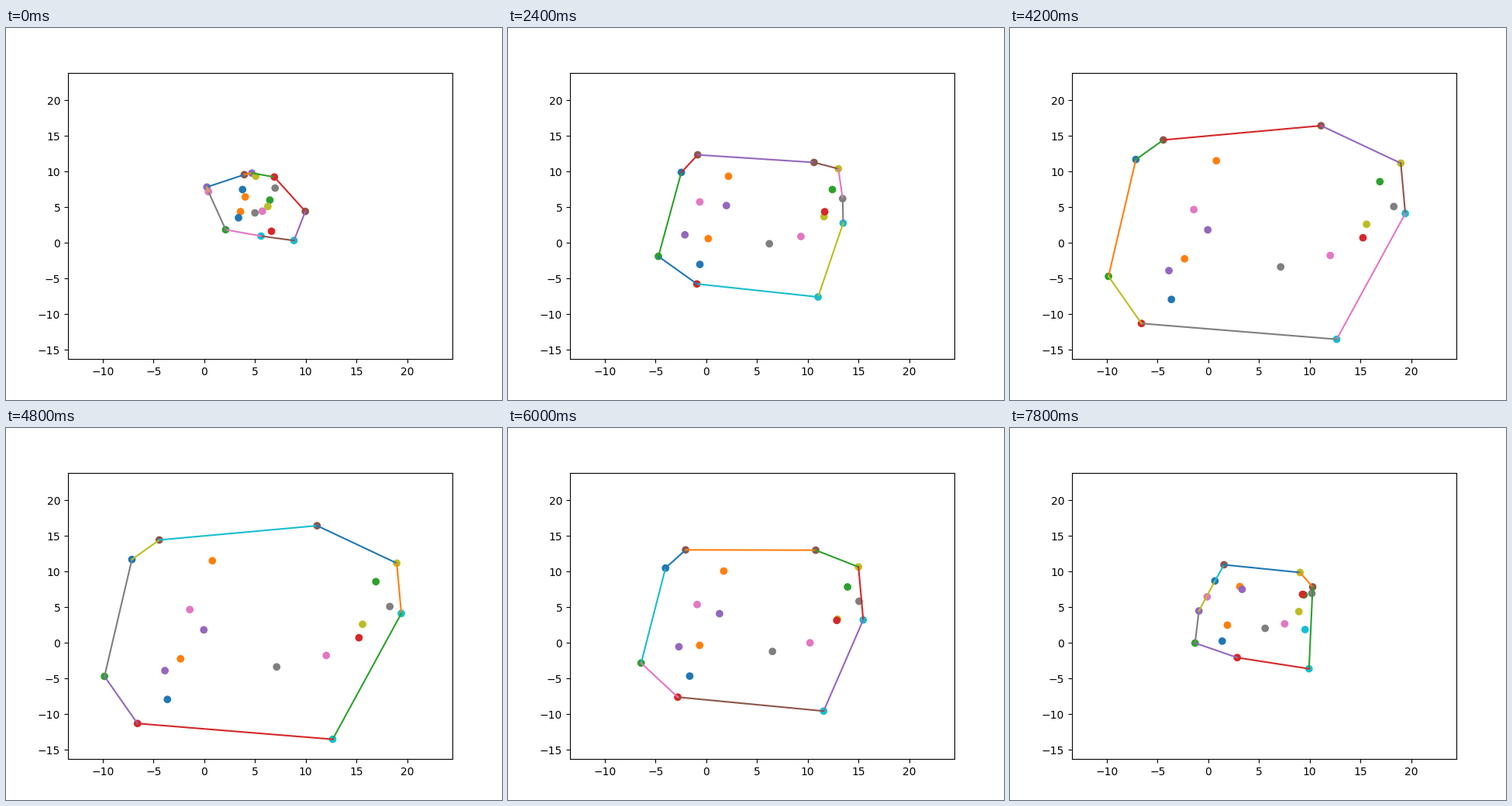
A matplotlib script for the animation above (8000 ms loop, 640x480 px).

```python
import numpy as np
import matplotlib.pyplot as plt
from matplotlib.animation import FuncAnimation
from matplotlib.collections import LineCollection

TURN = 15          # step at which every point reverses
STEPS = 27
TICKS_PER_STEP = 3
COLORS = [f"C{i}" for i in range(10)]

# Stage pixels, y pointing down
ORIGIN = np.array([255.5, 276.75])
SCALE = np.array([13.1, -9.2])
CORE = np.array([316, 226])

# Bodies that shape the outline: colour, start x, y, velocity per step
OUTLINE = np.array([
    (2, 283.2, 260, -11.17, 4.3),
    (3, 342.3, 262, -12.35, 8.5),
    (4, 317, 187, -4.43, 5.23),
    (5, 307.2, 189, -7.83, -3.2),
    (7, 347, 206.3, 10.57, 1.7),
    (9, 328.8, 268.2, 12.93, -2.08),
    (0, 305, 208.2, -10.2, -2.77),
    (3, 346, 192, 7.8, 5.6),
    (4, 259, 205, -3.87, 7.7),
    (5, 386, 236.4, 1.08, -7.9),
    (6, 261, 211, -1.72, 1.65),
    (8, 322, 191, 13, -1.2),
    (9, 371.3, 274, 3.57, 9.1),
])


def inner_bodies():
    """Drift out of the core: three to a line on the left, four to an arc."""
    s = np.sqrt(np.linspace(0, 1, 3))
    t = np.linspace(0, np.pi / 2, 4)
    line = np.column_stack([266 - 58 * s, 171 + 179 * s])
    arc = np.column_stack([349 + 128 * np.cos(t), 198 + 110 * np.sin(t)])
    end = np.vstack([line, arc])
    start = CORE + 0.15 * (end - CORE)
    return np.column_stack([[1, 1, 0, 2, 8, 6, 7],
                            start, (end - start) / (TURN - 1)])


BODIES = np.vstack([inner_bodies(), OUTLINE])


def positions(step):
    travelled = TURN - abs(TURN - step)
    pixels = BODIES[:, 1:3] + BODIES[:, 3:] * travelled
    return (pixels - ORIGIN) / SCALE


def half_hull(points):
    chain = []
    for x, y in points:
        while len(chain) > 1:
            (x0, y0), (x1, y1) = chain[-2:]
            if (x1 - x0) * (y - y0) < (y1 - y0) * (x - x0):
                break
            chain.pop()
        chain.append((x, y))
    return chain


def hull_edges(points):
    """Edges clockwise from the leftmost point."""
    ordered = sorted(map(tuple, points))
    ring = half_hull(ordered) + half_hull(ordered[::-1])[1:]
    return list(zip(ring, ring[1:]))


# Edge colours keep cycling from one step to the next
states = []
used = 0
for step in range(STEPS):
    points = positions(step)
    edges = hull_edges(points)
    colors = [COLORS[(used + i) % 10] for i in range(len(edges))]
    states.append((points, edges, colors))
    used += len(edges)

fig, ax = plt.subplots(figsize=(6.4, 4.8), dpi=100)
dots = ax.scatter(*states[0][0].T, c=[COLORS[int(b[0])] for b in BODIES])
hull = LineCollection([], linewidths=1.5, capstyle="projecting", zorder=2)
ax.add_collection(hull, autolim=False)
ax.set_xlim(-13.416, 24.447)
ax.set_ylim(-16.326, 23.848)


def update(tick):
    points, edges, colors = states[tick // TICKS_PER_STEP]
    dots.set_offsets(points)
    hull.set_segments(edges)
    hull.set_color(colors)
    return dots, hull


anim = FuncAnimation(fig, update, frames=80, interval=100,
                     repeat=True, repeat_delay=0)
plt.show()
```
